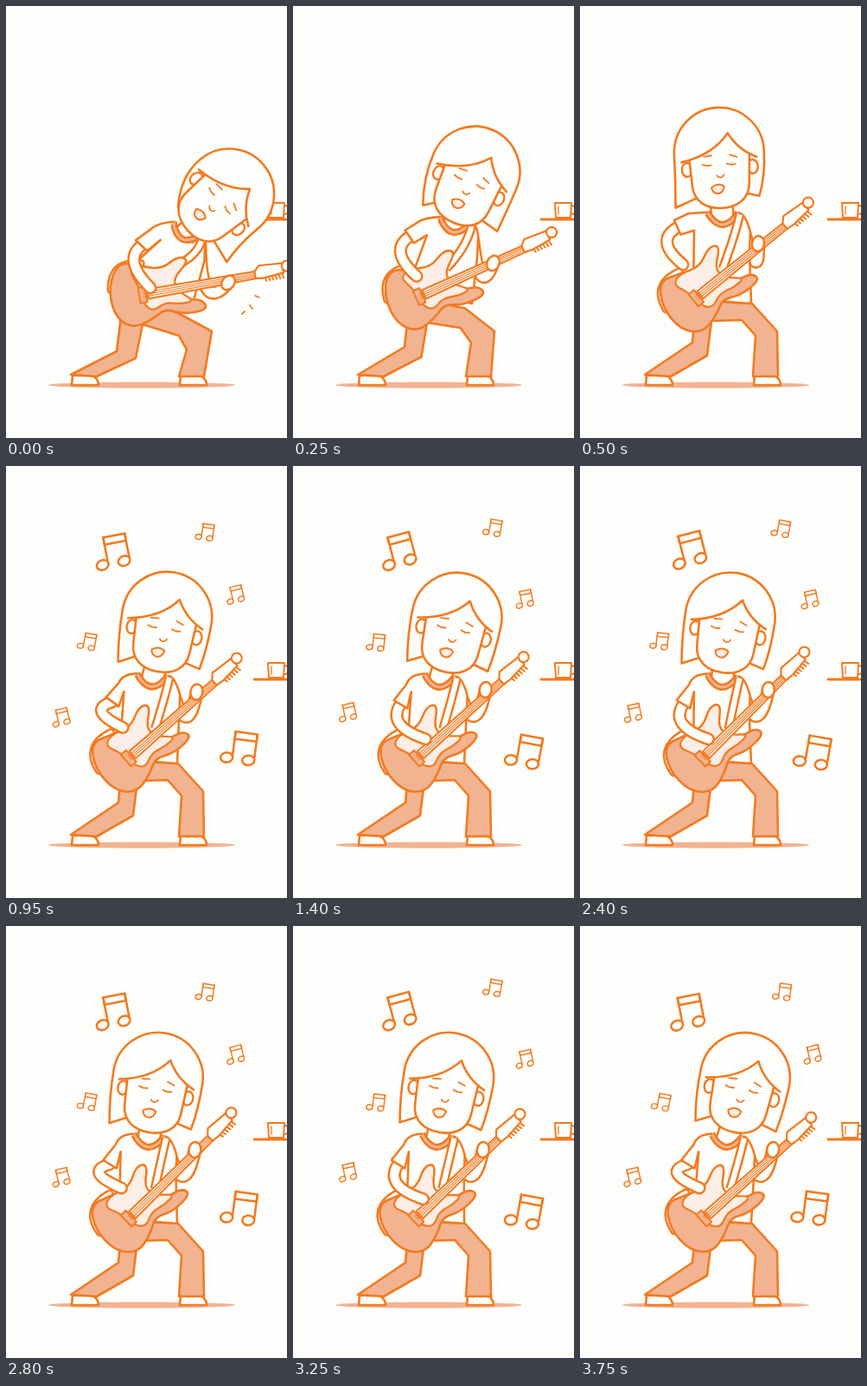
These frames come from a looping animation (325x498 px, 3800 ms). An HTML page with a canvas:

```html
<!DOCTYPE html>
<html lang="en">
<head>
<meta charset="utf-8">
<title>Guitar player</title>
<style>
html, body { margin: 0; width: 100%; height: 100%; overflow: hidden; background: #fdfefc; }
canvas { display: block; }
</style>
</head>
<body>
<canvas id="stage" width="325" height="498"></canvas>
<script>
const ctx = document.getElementById('stage').getContext('2d');
const LOOP = 3800, STEP = 50;
const INK = '#f37a1f', PINK = '#f2b391', PAPER = '#fdfefc', PALE = '#fbeee6';

// Each joint is x, y and, where it turns, an angle in degrees.
const LEANING = {
  head: [242, 230, 50], chest: [210, 256, 24], cuff: [150, 270, 43],
  strumElbow: [145, 296], strumHand: [167, 325],
  fretElbow: [231, 334], fretHand: [257, 319], guitar: [164, 332, -10]
};
const UPRIGHT = {
  head: [162, 190, -3], chest: [165, 238, 1], cuff: [109, 247, 66],
  strumElbow: [97, 273], strumHand: [119, 298],
  fretElbow: [204, 301], fretHand: [206, 274], guitar: [139, 333, -39]
};
const PLAYING = {
  head: [180, 195.5, 11], chest: [168, 241, 5], cuff: [115, 270, 31],
  strumElbow: [106, 285], strumHand: [136, 302],
  fretElbow: [209, 294], fretHand: [221, 258], guitar: [147, 333, -43]
};
const NOTES = [[124, 97], [233, 73], [267, 150], [95, 202], [62, 286], [270, 326]];

const rad = d => d * Math.PI / 180;
const ease = v => { const u = Math.max(0, Math.min(1, v)); return u * u * (3 - 2 * u); };
const turn = (x, y, deg) => {
  const c = Math.cos(rad(deg)), s = Math.sin(rad(deg));
  return [x * c - y * s, x * s + y * c];
};
const place = ([ox, oy, deg], x, y) => {
  const [dx, dy] = turn(x, y, deg);
  return [ox + dx, oy + dy];
};

function poseAt(t) {
  const from = t < 500 ? LEANING : UPRIGHT, to = t < 500 ? UPRIGHT : PLAYING;
  const u = ease(t < 500 ? t / 500 : (t - 500) / 600);
  const p = { lean: t < 500 ? 1 - u : 0 };
  for (const joint in from) p[joint] = from[joint].map((v, i) => v + (to[joint][i] - v) * u);
  if (t > 500) groove(p, t, u);
  return p;
}

// Body sways once per phrase while the hand strums on the beat.
function groove(p, t, amount) {
  const a = 2 * Math.PI * (t - 1200) / 2800;
  const sway = amount * (0.9 * Math.cos(a) - 0.25 * Math.sin(a) + 0.25 * Math.cos(2 * a) - 0.3);
  const strum = amount * (0.5 - 0.5 * Math.cos(2 * Math.PI * (t - 1900) / 925));
  for (const joint in p) if (joint !== 'lean') p[joint][0] += 3 * sway;
  p.head[0] += 6 * sway;
  p.head[2] += 2 * sway;
  p.guitar[0] -= 2 * sway;
  p.guitar[2] += 1.7 * sway;
  p.strumHand[0] += 16 * strum;
  p.strumHand[1] += 13 * strum;
  p.strumElbow[0] += 12 * strum;
  p.strumElbow[1] += 13 * strum;
}

function paint(fill, width = 2.6, stroke = INK) {
  if (fill) { ctx.fillStyle = fill; ctx.fill(); }
  if (width) { ctx.lineWidth = width; ctx.strokeStyle = stroke; ctx.stroke(); }
}
function poly(p, fill, width, open) {
  ctx.beginPath();
  for (let i = 0; i < p.length; i += 2) ctx.lineTo(p[i], p[i + 1]);
  if (!open) ctx.closePath();
  paint(fill, width);
}
const line = (p, width) => poly(p, null, width, true);

// Closed soft outline through the midpoints of its control points.
function blob(p, fill, width) {
  const n = p.length;
  ctx.beginPath();
  for (let i = 0; i <= n; i += 2) {
    const x = p[i % n], y = p[(i + 1) % n];
    const mx = (x + p[(i + 2) % n]) / 2, my = (y + p[(i + 3) % n]) / 2;
    if (i) ctx.quadraticCurveTo(x, y, mx, my); else ctx.moveTo(mx, my);
  }
  ctx.closePath();
  paint(fill, width);
}
function oval(x, y, rx, ry, tilt, fill, width) {
  ctx.beginPath();
  ctx.ellipse(x, y, rx, ry, tilt, 0, 7);
  paint(fill, width);
}
// A curved band, inked along both edges.
function tube(a, bend, b, width, fill = PAPER, cap = 'round') {
  ctx.lineCap = cap;
  ctx.beginPath();
  ctx.moveTo(...a);
  ctx.quadraticCurveTo(...bend, ...b);
  paint(null, width);
  paint(null, width - 5, fill);
  ctx.lineCap = 'round';
}
function limb(a, elbow, b, width) {
  const bend = elbow.map((v, i) => v + 0.6 * (v - (a[i] + b[i]) / 2));
  tube(a, bend, b, width);
}
function within([x, y, deg], scale, draw) {
  ctx.save();
  ctx.translate(x, y);
  ctx.rotate(rad(deg));
  ctx.scale(scale, scale);
  draw();
  ctx.restore();
}

function drawShelf() {
  line([287, 246, 330, 246], 2.8);
  poly([303, 227, 322, 227, 321, 244, 304, 244], PAPER, 2);
  line([307, 231, 307, 240], 1.3);
  ctx.beginPath();
  ctx.arc(322, 235, 5, -1.4, 1.4);
  paint(null, 2);
}

function drawNotes(t) {
  NOTES.forEach(([x, y], n) => {
    const big = n === 0 || n === 5;
    const scale = (big ? 0.94 : 0.48) * ease((t - 550 - n * 25) / 200);
    if (!scale) return;
    const beat = 2 * Math.PI * t / 925 + n * 2;
    const at = [x + 2 * Math.sin(beat / 2), y + 3 * Math.sin(beat), (n % 2 ? 9 : -13) + 2 * Math.cos(beat)];
    const w = big ? 2.7 : 3;
    within(at, scale, () => {
      poly([-9, -18, 18, -18, 18, -9, -9, -9], PAPER, w);
      for (const stem of [-9, 18]) {
        line([stem, -18, stem, 14], w);
        oval(stem - 7, 15, 7.5, 6, -0.2, PAPER, w);
      }
    });
  });
}

function drawLegs(k) {
  oval(157, 437, 108, 3.6, 0, PINK, 0);
  for (const x of [76, 201]) {
    ctx.beginPath();
    ctx.moveTo(x + 1, 426);
    ctx.lineTo(x, 437);
    ctx.lineTo(x + 31, 437);
    ctx.quadraticCurveTo(x + 31, 429, x + 23, 426);
    ctx.closePath();
    paint(PAPER);
  }
  poly([132, 336 - 30 * k, 132, 366, 130 - 2 * k, 388 + 10 * k, 75, 425, 105, 427,
    147 + 3 * k, 403 + 3 * k, 152 + 6 * k, 363 + 4 * k, 187 + 13 * k, 362 + 18 * k,
    203 + 6 * k, 380 + 16 * k, 200, 427, 229, 427, 228 + 10 * k, 375,
    199, 343 + 11 * k, 163, 341], PINK);
}

function drawTorso(p) {
  const k = p.lean, left = place(p.chest, -18, 0), right = place(p.chest, 18, 0);
  const shoulder = [right[0] + 14 - 10 * k, right[1] + 22 - 15 * k];
  const [sx, sy] = shoulder, [gx, gy] = p.guitar;
  limb([sx - 6, sy + 4], p.fretElbow, p.fretHand, 16);

  ctx.beginPath();
  ctx.moveTo(left[0] - 15, left[1] + 21);
  ctx.lineTo(131 + 5 * k, 338 - 30 * k);
  ctx.lineTo(198 + 18 * k, 343);
  ctx.lineTo(sx - 1, sy + 24);
  ctx.lineTo(sx, sy);
  ctx.quadraticCurveTo(right[0] + 8, right[1], ...right);
  ctx.lineTo(...left);
  paint(PAPER, 0);
  ctx.beginPath();
  ctx.moveTo(left[0] - 15, left[1] + 21);
  ctx.lineTo(131 + 5 * k, 338 - 30 * k);
  ctx.lineTo(198 + 18 * k, 343);
  ctx.lineTo(sx - 1, sy + 24);
  ctx.lineTo(sx, sy);
  ctx.quadraticCurveTo(right[0] + 8, right[1], ...right);
  paint();

  const nape = place(p.chest, 0, 9);
  tube(nape, nape, p.head.slice(0, 2), 28, PAPER, 'butt');
  tube(left, place(p.chest, 0, 28), right, 8, PINK, 'butt');
  tube(place(p.chest, 20, 2), [right[0] - 4, right[1] + 27], [gx + 26, gy - 30], 11, PAPER, 'butt');
}

function drawHair(head) {
  const deg = head[2], a = rad(deg), R = 52;
  const dome = place(head, 0, -21);
  const leftEnd = place(head, -R, -21), rightEnd = place(head, R, -21);
  const leftTip = place([...leftEnd, deg * 0.5], 0, 61);
  const rightTip = place([...rightEnd, deg * 0.7 + 8], 0, 53);
  ctx.beginPath();
  ctx.moveTo(...place(head, -26, 29));
  ctx.lineTo(...leftTip);
  ctx.quadraticCurveTo(...place(head, -R, 9), ...leftEnd);
  ctx.arc(...dome, R, a + Math.PI, a + 2 * Math.PI);
  ctx.quadraticCurveTo(...place(head, R, 9), ...rightTip);
  ctx.lineTo(...place(head, 28, 27));
  ctx.lineTo(head[0], head[1]);
  ctx.closePath();
  paint(PAPER);
}

function fringe() {
  ctx.beginPath();
  ctx.moveTo(-44, -12);
  ctx.quadraticCurveTo(-7, -19, 11, -43);
  ctx.quadraticCurveTo(22, -23, 43, -14);
}

function drawHead(p) {
  drawHair(p.head);
  within(p.head, 1, () => {
    for (const side of [-38, 38]) oval(side, -3, 6, 8, 0, PAPER, 2.4);
    ctx.beginPath();
    ctx.moveTo(-35, -18);
    ctx.lineTo(-33, 16);
    ctx.bezierCurveTo(-32, 34, -18, 43, 0, 43);
    ctx.bezierCurveTo(18, 43, 32, 34, 33, 16);
    ctx.lineTo(35, -18);
    paint(PAPER);

    fringe();
    ctx.arc(0, -21, 50, 0.1, Math.PI - 0.1, true);
    paint(PAPER, 0);
    fringe();
    paint();

    for (const x of [-20, 8]) line([x, -8, x + 5, -6.5, x + 10, -7], 1.8);
    line([-18, -17, -9, -18], 1.8);
    line([12, -18, 20, -15], 1.8);
    ctx.beginPath();
    ctx.arc(0, 3, 4.5, 0.3, 2.6);
    paint(null, 1.8);
    ctx.beginPath();
    ctx.moveTo(-11, 19);
    ctx.quadraticCurveTo(-3, 13, 4, 18);
    ctx.quadraticCurveTo(2, 27, -5, 26);
    ctx.quadraticCurveTo(-10, 25, -11, 19);
    paint(PALE, 2);
  });
}

function drawGuitar(guitar) {
  within(guitar, 1, () => {
    tube([-2, -36], [-36, -45], [-41, -12], 10);
    blob([-4, -34, -27, -42, -43, -17, -43, 17, -25, 36, 0, 30, 17, 20, 36, 30,
      65, 30, 62, 18, 44, 14, 32, 2, 31, -12, 54, -30, 42, -37, 20, -25], PINK);
    blob([-4, -34, 20, -25, 42, -37, 54, -30, 31, -12, 36, 4, 52, 17, 36, 18,
      18, 13, 2, 21, -7, 10, -9, -12, -17, -28], PALE, 2.2);
    poly([-10, -9, -2, -9, -2, 9, -10, 9], PINK, 2);
    poly([0, -5.5, 134, -4, 134, 4, 0, 5.5], PALE, 2);
    for (const y of [-2.4, 0, 2.4]) line([-5, y, 128, y * 0.8], 1);
    for (let x = 137; x < 159; x += 4) line([x, 4, x + 1, 9], 2);
    poly([126, -4, 132, -10, 159, -8, 159, 3, 136, 5, 126, 4], PAPER, 2.2);
    oval(164, -4, 6, 6, 0, PAPER, 2.2);
  });
}

function drawArms(p) {
  const [lx, ly] = place(p.chest, -18, 0);
  const outer = p.cuff.slice(0, 2), inner = place(p.cuff, 18, 0);
  limb(place(p.cuff, 9, 0), p.strumElbow, p.strumHand, 15);
  ctx.beginPath();
  ctx.moveTo(lx, ly);
  ctx.quadraticCurveTo(lx - 17, ly + 1, (lx + outer[0]) / 2 - 3, (ly + outer[1]) / 2 - 3);
  ctx.lineTo(...outer);
  ctx.lineTo(...inner);
  ctx.lineTo(lx - 15, ly + 21);
  paint(PAPER);
  oval(...p.fretHand, 9, 7, rad(p.guitar[2] - 40), PAPER, 2.5);
}

function drawFlicks(t) {
  if (t >= 150) return;
  for (const [x, y, dx, dy] of [[273, 355, 3, -3], [282, 345, 3, 4], [288, 334, 5, 2]]) {
    line([x, y + t / 25, x + dx, y + dy + t / 25], 1.8);
  }
}

function render(t) {
  const pose = poseAt(t);
  ctx.fillStyle = PAPER;
  ctx.fillRect(0, 0, 325, 498);
  ctx.lineJoin = ctx.lineCap = 'round';
  drawShelf();
  drawNotes(t);
  drawLegs(pose.lean);
  drawTorso(pose);
  drawHead(pose);
  drawGuitar(pose.guitar);
  drawArms(pose);
  drawFlicks(t);
}

const start = performance.now();
function tick() {
  const t = (performance.now() - start) % LOOP;
  render(Math.floor(t / STEP) * STEP);
  requestAnimationFrame(tick);
}
tick();
</script>
</body>
</html>
```
